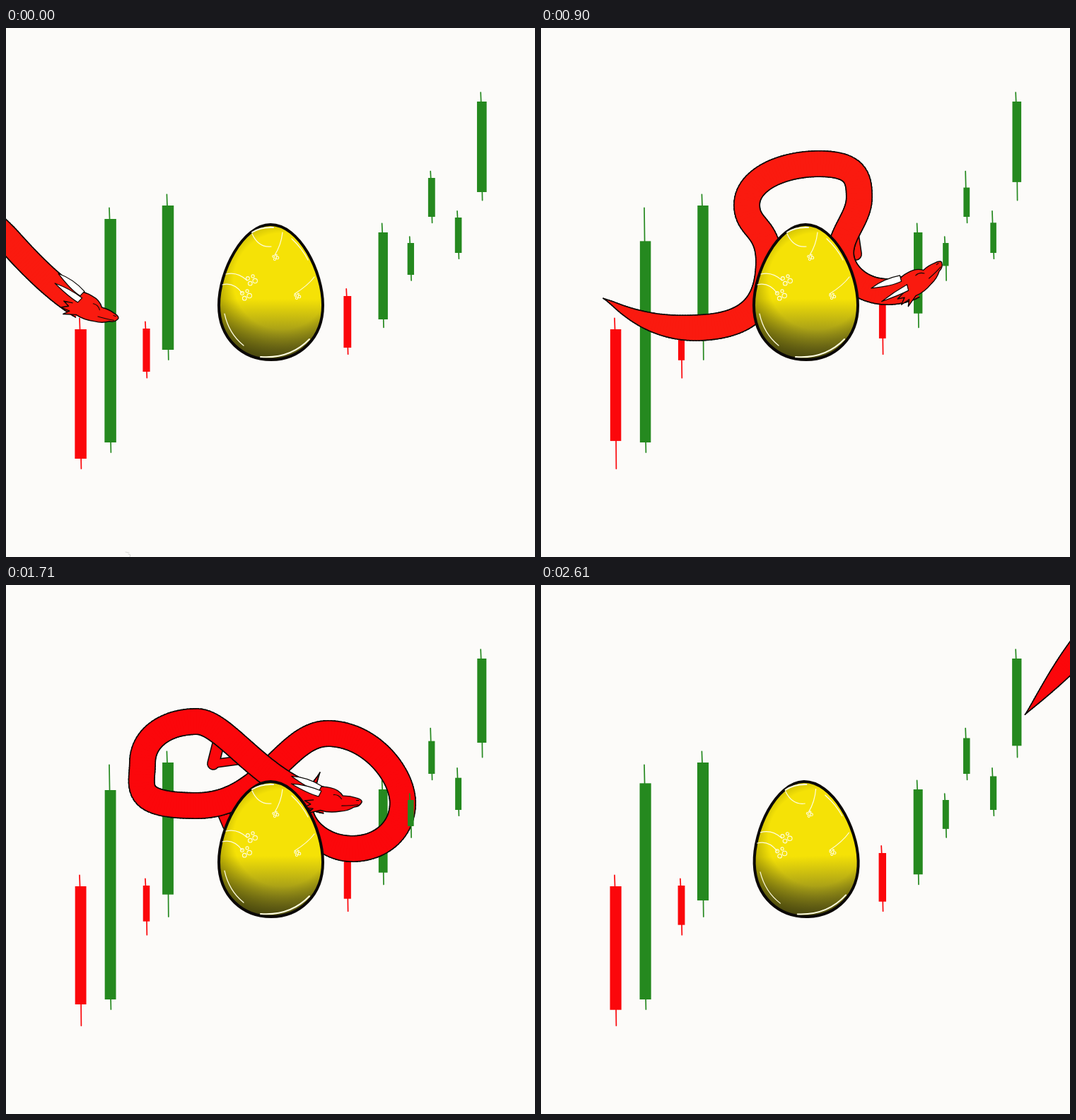
An HTML page with a canvas that plays this animation: 748x748 px, repeating every 2.7 s.

```html
<!DOCTYPE html>
<html lang="en">
<head>
<meta charset="utf-8">
<title>Dragon, egg and candles</title>
<style>
html, body { margin: 0; width: 100%; height: 100%; overflow: hidden; background: #fcfbf9; }
canvas { display: block; }
</style>
</head>
<body>
<canvas id="stage" width="748" height="748"></canvas>
<script>
const ctx = document.getElementById('stage').getContext('2d');
const LOOP = 2700, STEP = 90, BEAT = 540;
const INK = '#0b0806', RED = '#fb070b', GREEN = '#25891f', SHINE = '#fffde0';

// Centre line the dragon slides along; lengths count from where it enters the stage
const LEAD = 290;
const route = document.createElementNS('http://www.w3.org/2000/svg', 'path');
route.setAttribute('d', `M-200 86L0 296C70 375 130 424 213 424S320 390 322 335S291 285 291 250
  S340 192 393 192S450 212 450 240S424 290 424 318S452 373 490 373S561 348 561 308
  S515 210 455 210S365 312 270 312S193 285 193 251S225 193 270 193S375 308 482 308
  S650 225 748 107L1000-195`);
const points = Array.from({ length: Math.ceil(route.getTotalLength()) }, (_, s) => route.getPointAtLength(s));

let time, skin;

function at(s) {
  const { x, y } = points[Math.max(0, Math.min(points.length - 1, Math.round(s) + LEAD))];
  // The tail levels out as it comes in
  return [x, y + .007 * Math.max(0, 105 - x) ** 2 * Math.min(1, time / 720)];
}

// Unit direction of the route
function heading(s) {
  const a = at(s - 4), b = at(s + 4), dx = b[0] - a[0], dy = b[1] - a[1], d = Math.hypot(dx, dy) || 1;
  return [dx / d, dy / d];
}

function ink(path, width = 1.6, color = INK) {
  ctx.strokeStyle = color;
  ctx.lineWidth = width;
  ctx.stroke(typeof path === 'string' ? new Path2D(path) : path);
}

function line(coords, width, color) {
  ink('M' + coords.join('L'), width, color);
}

function fill(path, color) {
  ctx.fillStyle = color;
  ctx.fill(path);
}

// x, top, bottom, shrink: positive lowers the top, negative lifts the bottom
const candles = [
  [105.6, 426, 609, -48], [147.6, 270, 586, 60], [198.5, 425, 486, -31], [229, 251, 455, -52],
  [482.8, 379, 452, -25], [533.2, 289, 412, -16], [572.3, 304, 349, -24], [601.8, 212, 267, 26],
  [639.6, 268, 318, 14], [672.8, 104, 232, -27]
];

function drawCandle([x, top, bottom, shrink], i) {
  const color = i % 2 || i > 4 ? GREEN : RED;
  const phase = time % BEAT / STEP, p = phase < 3 ? phase / 3 : ((6 - phase) / 3) ** 1.6;
  const w = Math.min(16.5, 7 + (bottom - top) * .052);
  const y = top + Math.max(0, shrink) * p, y2 = bottom + Math.min(0, shrink) * p;
  line([[x - 1.6, top - w * .95], [x - 1, y + 2]], 1.7, color);
  line([[x + .5, y2 - 2], [x + .8, bottom + w * .85]], 1.7, color);
  ctx.fillStyle = color;
  ctx.fillRect(x - w / 2 + p, y, w - 2 * p, y2 - y);
}

function drawBody(tail, end) {
  const edges = s => {
    const [x, y] = at(s), [dx, dy] = heading(s);
    const half = 18.2 * Math.sin(Math.min(1, Math.max(0, s - tail) / 150) * Math.PI / 2);
    return [[x + dy * half, y - dx * half], [x - dy * half, y + dx * half]];
  };
  // Short pieces from tail to head, so that later parts cover earlier ones
  for (let s = tail; s < end; s += 4) {
    const [l0, r0] = edges(s - 2), [l1, r1] = edges(s + 4);
    fill(new Path2D('M' + [l0, l1, r1, r0].join('L')), skin);
    line([l0, l1]);
    line([r0, r1]);
  }
}

// Knee and foot are offsets from the hip, mirrored with the direction of travel
function drawLeg(s, kneeX, kneeY, footX, footY) {
  const [x, y] = at(s), [dir] = heading(s);
  const knee = [x + kneeX * dir, y + kneeY], foot = [x + footX * dir, y + footY];
  line([[x, y], knee], 18, INK);
  line([knee, foot], 13, INK);
  line([[x, y], knee], 15, skin);
  line([knee, foot], 10, skin);
  ctx.save();
  ctx.translate(...foot);
  ctx.rotate(Math.atan2(foot[1] - knee[1], foot[0] - knee[0]));
  for (const o of [-1, 0, 1]) {
    const claw = new Path2D(`M2 ${o * 5 - 3}Q14 ${o * 9 - 3} 20 ${o * 10 + 2}Q12 ${o * 8 + 3} 2 ${o * 5 + 3}`);
    fill(claw, '#fff');
    ink(claw, 1.3);
  }
  ctx.restore();
}

const headShape = new Path2D('M-78-17Q-66-22-52-19Q-38-17-31-7Q-20-8-10-5Q0-3 0 1Q-3 9-12 10' +
  'Q-22 17-34 18Q-52 22-66 18L-86 24L-78 16L-93 15L-82 9L-92 4L-78 2');
const HEAD_SIZE = .88;

function drawHead(s) {
  const base = at(s - 70 * HEAD_SIZE), tip = at(s);
  // The head stays closer to level than the neck
  const angle = Math.atan2((tip[1] - base[1]) * .75, tip[0] - base[0]);
  const side = Math.abs(Math.cos(angle)), top = 1 - side * side;
  ctx.save();
  ctx.translate(...base);
  ctx.rotate(angle);
  ctx.scale(HEAD_SIZE, Math.cos(angle) < 0 ? -HEAD_SIZE : HEAD_SIZE);
  ctx.translate(70, 0);
  fill(headShape, skin);
  ink(headShape);
  ink('M-46-8Q-38-9-33-2M-32 9Q-16 8-6 6M-9-1l4 0', 1.3);
  for (const o of [-1, 1]) {
    const y = -13 * side + o * (4 + 14 * top), y2 = -28 * side + o * (6 + 20 * top);
    const horn = new Path2D(`M-66 ${y - 4}Q-90 ${y2} -115 ${y2}Q-86 ${y + 2} -70 ${y + 5}Z`);
    fill(horn, '#fff');
    ink(horn, 1.4);
  }
  ctx.restore();
}

const eggShape = new Path2D('M374 278C415 278 448 345 448 392S415 469 375 469S301 440 301 392S335 278 374 278Z');
const yolk = ctx.createLinearGradient(0, 278, 0, 469);
yolk.addColorStop(.55, '#f5e206');
yolk.addColorStop(.8, '#a39b18');
yolk.addColorStop(1, '#6b6722');
const rim = ctx.createRadialGradient(390, 358, 68, 390, 358, 118);
rim.addColorStop(0, 'rgba(45,45,0,0)');
rim.addColorStop(1, 'rgba(45,45,0,.65)');

function drawBubbles(x, y, size) {
  for (let i = 0; i < 4; i++) {
    const bubble = new Path2D(), a = i * 1.6 + .3;
    bubble.arc(x + 1.7 * size * Math.cos(a), y + 1.7 * size * Math.sin(a), size * (1 - i * .12), 0, 7);
    ink(bubble, 1.1, SHINE);
  }
}

// The egg rocks as the dragon circles it and leans as the dragon leaves
function eggTilt() {
  if (time > 540 && time < 1260) return .065 * Math.sin((time - 540) / 360 * Math.PI);
  return time > 1980 ? -.2 * Math.sin((time - 1980) / 720 * Math.PI) ** 2 : 0;
}

function drawEgg(angle) {
  ctx.save();
  ctx.translate(375, 370);
  ctx.rotate(angle);
  ctx.translate(-375, -370);
  fill(eggShape, yolk);
  fill(eggShape, rim);
  ink(eggShape, 4);
  ink('M311 348Q327 344 341 357M306 363Q322 359 334 375M348 291Q357 311 375 309M391 289Q389 307 380 321' +
    'M436 352Q427 364 408 376M309 404Q315 432 336 449M404 298Q419 312 427 328', 1.2, SHINE);
  ink('M348 289Q360 281 378 282M360 465Q402 468 429 440', 2, SHINE);
  drawBubbles(347, 356, 3.2);
  drawBubbles(339, 377, 3.2);
  drawBubbles(381, 324, 1.8);
  drawBubbles(412, 379, 1.8);
  ctx.restore();
}

function draw() {
  time = Math.floor(performance.now() % LOOP / STEP) * STEP;
  skin = time % BEAT % 360 ? RED : '#fa1a0f';
  const since = time - 720;
  const head = 200 + .83 * time + .27 * Math.max(0, since);
  const tail = 60 + .28 * since + .000427 * Math.max(0, since) ** 2;
  const angle = eggTilt();

  ctx.fillStyle = '#fcfbf9';
  ctx.fillRect(0, 0, 748, 748);
  ctx.lineJoin = ctx.lineCap = 'round';
  if (time % BEAT === 0) ink('M169 741l5 1M173 744l3 1-1 3', .8, '#cfcecb');

  candles.forEach((c, i) => i < 6 && drawCandle(c, i));
  drawLeg(head - Math.min(530, .6 * (head - tail)), -14, 32, -26, 58);
  drawLeg(head - 230, -14, 44, 42, 38);
  drawBody(tail, head - 62 * HEAD_SIZE);
  drawHead(head);
  candles.forEach((c, i) => i > 5 && drawCandle(c, i));
  drawEgg(angle);

  if (angle > .05) ink('M313 299L321 296L316 305L326 303L317 311M429 306L436 310L432 314L440 318', 1.8);
  if (angle < -.15) ink('M302 310L309 309L302 315L309 317L303 325M427 308L433 309L430 315L437 322', 1.8);
  requestAnimationFrame(draw);
}
draw();
</script>
</body>
</html>
```
